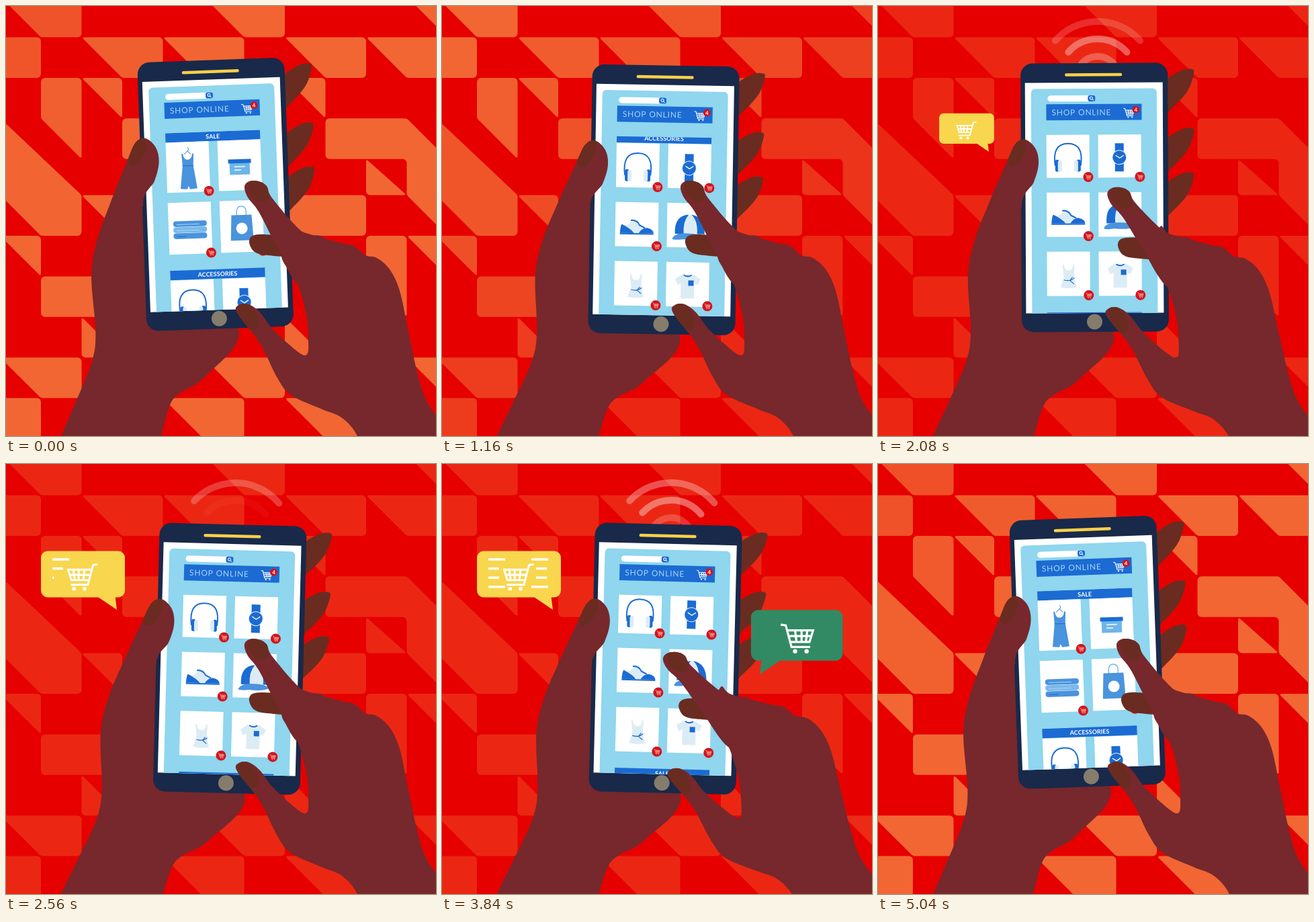
Write an HTML page with a canvas that moves like this. It is 640 px wide and 640 px high and loops after 5080 ms.

```html
<!DOCTYPE html>
<html lang="en">
<head>
<meta charset="utf-8">
<title>Shop online</title>
<style>
html, body { margin: 0; overflow: hidden; background: #e60000; }
canvas { display: block; }
</style>
</head>
<body>
<canvas id="stage" width="640" height="640"></canvas>
<script>
const g = document.getElementById('stage').getContext('2d');
const LOOP = 5080, STEP = 40, BEAT = 1680, LIST = 486;
const RED = '#e60000', NAVY = '#18294a', BLUE = '#1b6bd3', MID = '#4a93dd', SKY = '#8fd6ee',
  PALE = '#dcecf5', SKIN = '#76282c', DARK = '#6a2c20', BADGE = '#d3141c';

const clamp = v => Math.min(1, Math.max(0, v));
const ramp = (t, a, b) => clamp((t - a) / (b - a));
const swing = (t, a, b) => (1 - Math.cos(Math.PI * ramp(t, a, b))) / 2;
const easeOut = (t, a, b) => 1 - (1 - ramp(t, a, b)) ** 2;
const backOut = x => 1 + 2.7 * (x - 1) ** 3 + 1.7 * (x - 1) ** 2;

// ---------- drawing helpers ----------
function group(draw) { g.save(); draw(); g.restore(); }
function turn(deg, x, y) {
  g.translate(x, y);
  g.rotate(deg * Math.PI / 180);
  g.translate(-x, -y);
}
function rect(x, y, w, h, color, r = 0) {
  g.fillStyle = color;
  g.beginPath();
  g.roundRect(x, y, w, h, r);
  g.fill();
}
function oval(x, y, rx, ry, angle, color) {
  g.fillStyle = color;
  g.beginPath();
  g.ellipse(x, y, rx, ry, angle, 0, 7);
  g.fill();
}
const disc = (x, y, r, color) => oval(x, y, r, r, 0, color);
function fill(d, color) { g.fillStyle = color; g.fill(new Path2D(d)); }
function line(d, color, w) {
  g.strokeStyle = color;
  g.lineWidth = w;
  g.stroke(new Path2D(d));
}
function label(s, x, y, font, color, align = 'center', spacing = 0) {
  g.font = font + ' Lato, sans-serif';
  g.fillStyle = color;
  g.textAlign = align;
  g.letterSpacing = spacing + 'px';
  g.fillText(s, x, y);
}
// Closed Catmull-Rom outline through a few "x,y" points.
function outline(text) {
  const p = text.split(' ').map(s => s.split(',').map(Number)), path = new Path2D();
  const at = i => p[(i + p.length) % p.length];
  path.moveTo(...p[0]);
  p.forEach((a, i) => {
    const z = at(i - 1), b = at(i + 1), c = at(i + 2);
    path.bezierCurveTo(a[0] + (b[0] - z[0]) / 6, a[1] + (b[1] - z[1]) / 6,
      b[0] - (c[0] - a[0]) / 6, b[1] - (c[1] - a[1]) / 6, ...b);
  });
  return path;
}
function limb(path, nail) {
  g.fillStyle = SKIN;
  g.fill(path);
  group(() => {
    g.clip(path);
    oval(...nail, DARK);
  });
}
function cart(x, y, size, color, flip = 1) {
  group(() => {
    g.translate(x, y);
    g.scale(size * flip, size);
    line('M-23-18L-16-17L-8 13H18M-14-10H22L17 6H-10M-12-2H19M-3-10L-1 6M6-10V6M14-10L12 6', color, 3);
    disc(-3, 19, 3, color);
    disc(13, 19, 3, color);
  });
}

// ---------- background: shapes as corner steps on a square grid ----------
const KINDS = {
  s: '00 20 21 11', d: '00 10 12 01', t: '00 10 11', l: '00 11 01',
  x: '00 10 11 01', r: '00 20 21 01', b: '00 22 23 13 02', h: '00 20 31 33 22 21 01'
};
const PATTERN = [
  's....s....s', 'x.s.s..s.s', '.dt....t', 'b..x....h', '.........l', '..t....r',
  't........ds', '.r', '..l....l', 's....s....s', 'x...s..s'
];
const gridX = c => c * 60.5 - 8.5;
const gridY = r => r * 60.4 + (r < 4 ? 46.5 : 40);
const tiles = PATTERN.flatMap((cells, r) => [...cells].flatMap((kind, c) => {
  if (kind === '.') return [];
  const pts = KINDS[kind].split(' ').map(([x, y]) => [gridX(c + +x), gridY(r - 1 + +y)]);
  const far = clamp(1 - pts.reduce((s, [x, y]) => s + 0.45 * x + 0.55 * y, 0) / pts.length / 640);
  return [{ pts, far }];
}));
// Square corners are rounded, sharp ones hardly.
function tile(p) {
  const n = p.length, at = i => p[(i + n) % n];
  g.beginPath();
  g.moveTo((at(-1)[0] + p[0][0]) / 2, (at(-1)[1] + p[0][1]) / 2);
  p.forEach(([x, y], i) => {
    const [a, b] = at(i - 1), [u, v] = at(i + 1);
    g.arcTo(x, y, u, v, (a - x) * (u - x) + (b - y) * (v - y) > 500 ? 1.5 : 6);
  });
  g.fill();
}
function background(t) {
  rect(0, 0, 640, 640, RED);
  const late = t < 400 ? t + LOOP : t;
  for (const { pts, far } of tiles) {
    const out = 400 + far * 850, back = 3740 + far * 900;
    const glow = late < 3000 ? 1 - ramp(t, out, out + 550) : ramp(late, back, back + 700);
    g.fillStyle = `rgba(242,102,51,${0.38 + 0.62 * glow})`;
    tile(pts);
  }
}

// ---------- shop items, each around its own centre ----------
const items = {
  dress() {
    line('M-5-22L0-27L5-22M0-27Q4-30 0-32', MID, 1);
    fill('M-9-23H-7Q-6-14 0-14Q6-14 7-23H9L8-5L13 29L2 30L0 25L-2 30L-12 29L-8-5Z', MID);
    line('M-8-5H8', BLUE, 1);
  },
  parcel() {
    rect(-15, -7, 30, 18, '#6db5ea');
    rect(-17, -12, 34, 6, BLUE);
    line('M-8-1H8M-8 4H2', PALE, 2);
  },
  towels() {
    for (const y of [-14, -5, 4]) {
      rect(-25, y, 50, 8.5, y === -5 ? '#79b9ea' : MID, 4);
      line(`M-20 ${y + 5}H${y > 0 ? -6 : 14}`, y > 0 ? BLUE : '#a9d4f5', 1);
    }
  },
  bag() {
    line('M-7-19V-26Q-6-33 0-33Q6-33 7-26V-19', '#79b9ea', 1.5);
    fill('M-15-20H15L17 18H-17Z', MID);
    disc(0, 0, 8.5, '#fff');
  },
  phones() {
    line('M-19 12Q-24-21 0-21Q24-21 19 12', BLUE, 2);
    for (const s of [-1, 1]) {
      rect(s * 16 - 3, 3, 6, 18, BLUE, 3);
      rect(s * 12 - 3, 4, 6, 17, PALE, 3);
    }
  },
  watch() {
    rect(-7, -21, 13, 42, BLUE);
    disc(-0.5, 0, 11, PALE);
    disc(-0.5, 0, 10, BLUE);
    line('M-6-3L0 1L6-3', '#fff', 1.3);
  },
  shoe() {
    fill('M-25 10Q-24-3-22-3Q-12 2-6-11L2-9Q6 1 16 2Q25 4 25 10Z', PALE);
    fill('M-25 10Q-24-3-22-3Q-8 4-4 10ZM3 10Q8 2 15 2Q25 4 25 10Z', BLUE);
    line('M-9-9Q0-10 4-2L12 2M-25 11H25', BLUE, 2);
  },
  cap() {
    fill('M-20 10Q-22-19 2-19Q23-18 24 10Z', PALE);
    fill('M-20 10Q-22-17 0-19Q-9-8-7 10ZM13 10Q14-10 4-19Q24-16 24 10Z', BLUE);
    fill('M-24 17Q-20 8 0 9Q16 9 23 15Q14 20-8 18Q-24 20-24 17Z', MID);
  },
  top() {
    fill('M-9-17L-7-17Q-6-8 0-8Q6-8 7-17L9-17L8 2L12 17Q0 20-12 17L-7 2Z', PALE);
    line('M-7 6Q2 9 9 3M2 7L8 12M2 7L6 2', BLUE, 1.2);
  },
  shirt() {
    fill('M-8-18Q0-13 8-18L19-11L15-2L10-5V18H-10V-5L-15-2L-19-11Z', PALE);
    line('M-6-17Q0-13 6-17', BLUE, 2);
    rect(1, -9, 8, 8, BLUE);
  }
};
function shelf(y, h, ...names) {
  names.forEach((name, i) => {
    const x = 252 + 77 * i;
    rect(x, y, 64, h, '#fff');
    group(() => {
      g.translate(x + 32, y + h / 2 + 3);
      items[name]();
    });
    disc(x + 62, y + h - 1, 7.5, BADGE);
    cart(x + 62, y + h - 1, 0.2, '#f6c3b8');
  });
}
function heading(text, y) {
  rect(252, y - 7, 141, 14, BLUE);
  label(text, 322.5, y + 3.3, 'bold 9px', '#fff');
}
function catalogue() {
  heading('SALE', 198.5);
  shelf(205.5, 75, 'dress', 'parcel');
  shelf(295.5, 77, 'towels', 'bag');
  heading('ACCESSORIES', 403.5);
  shelf(411, 66, 'phones', 'watch');
  shelf(499, 66, 'shoe', 'cap');
  shelf(587, 66, 'top', 'shirt');
}

// ---------- phone and left hand ----------
function scroll(t) {
  return 221.5 * easeOut(t, 460, 1370) + 2.5 * ramp(t, 2080, 3080) + 262 * easeOut(t, 3830, 5020);
}
function phone(t) {
  rect(214, 85, 219, 400, NAVY, 18);
  rect(280, 100, 85, 4.5, '#f8d04a', 2);
  rect(220.5, 114, 205, 343, '#fff');
  rect(229.5, 123, 187, 334, SKY, [6, 6, 0, 0]);
  disc(322.5, 470, 11.5, '#857c6c');

  rect(254, 133, 71, 9, '#fff', 4.5);
  rect(314, 133, 11, 9, BLUE, 3);
  line('M320.5 138.5L322.5 140.5M321 137A2 2 0 1 1 317 137A2 2 0 1 1 321 137', '#fff', 1);
  rect(252, 146, 142, 24, BLUE);
  label('SHOP ONLINE', 260, 162.5, '12px', '#a9d4f5', 'left', 0.8);
  cart(375, 159, 0.36, '#fff');
  disc(385.5, 154.5, 5.5, BADGE);
  label('4', 385.5, 157.5, 'bold 8px', '#fff');

  group(() => {
    g.beginPath();
    g.rect(229, 191.5, 188, 265.5);
    g.clip();
    g.translate(0, -scroll(t));
    catalogue();
    g.translate(0, LIST);
    catalogue();
  });
}
function wifi(p) {
  g.lineCap = 'round';
  for (let i = 0; i < 3; i++) {
    const a = 0.55 * clamp((p - 100 - 100 * i) / 250) * clamp((700 + 220 * i - p) / 500);
    g.strokeStyle = `rgba(248,205,200,${a})`;
    g.lineWidth = 10;
    g.beginPath();
    g.arc(327, 107, 32 + 26 * i, -2.42, -0.72);
    g.stroke();
  }
  g.lineCap = 'butt';
}
const backFinger = outline('425,20 449,0 467,-3 470,4 461,29 440,53 425,62');
const holder = outline('82,640 105,590 131,530 138,485 134,400 145,345 166,292 192,232 205,205 220,199 ' +
  '235,213 239,235 232,262 214,300 240,400 350,485 300,555 260,580 245,598 232,640 215,690 62,690');
const thumbNail = [207, 218, 11, 23, 0.45];
function leftHand(t, p) {
  const lift = swing(p, 300, 500) - swing(p, 1000, 1640);
  turn(-1.55 + 3.08 * lift, 143, 656);
  wifi(p);
  for (const y of [97, 185, 251]) group(() => {
    g.translate(0, y);
    g.fillStyle = DARK;
    g.fill(backFinger);
  });
  limb(holder, thumbNail);
  group(() => {
    turn(-0.5 + 0.45 * lift, 323, 470);
    phone(t);
  });
  group(() => {
    g.beginPath();
    g.rect(0, 0, 260, 300);
    g.clip();
    limb(holder, thumbNail);
  });
}

// ---------- right hand ----------
const palm = outline('425,325 441,336 500,353 518,357 535,371 552,375 571,392 586,424 599,485 612,545 626,588 ' +
  '660,640 670,690 540,690 523,640 500,613 470,600 424,579 403,552 378,502 344,457 347,445 361,444 ' +
  '378,456 400,484 444,520 450,494 446,455 432,408 410,372');
const index = outline('355,269 362,261 376,261 388,268 397,287 441,336 475,347 480,400 436,415 400,352 376,306 360,285');
const middle = outline('362,352 367,342 385,340 408,345 425,371 390,371 370,366');
function rightHand(p) {
  const press = swing(p, 300, 500) - swing(p, 540, 900);
  turn(-2 * press, 640, 640);
  g.fillStyle = DARK;
  g.fill(middle);
  limb(palm, [360, 461, 12, 24, -0.5]);
  turn(-6.6 * press, 450, 400);
  limb(index, [376, 275, 13, 19, -0.6]);
}

// ---------- speech bubbles, drawn from the tip of the tail ----------
function bubble(t, x, y, color, from, to, side, order) {
  const age = t - from;
  const size = backOut(ramp(age, 0, 500)) * (1 - ramp(t, to, to + 160));
  if (age <= 0 || size <= 0) return;
  group(() => {
    g.translate(x, y);
    g.scale(size * side, size);
    rect(-113, -87.5, 125, 69, color, 10);
    fill('M-28-19L0 0L-3-24Z', color);
    cart(-51, -50, 0.98, '#fff', -1);
    [...order].forEach((k, i) => {
      const n = k % 4, outer = n % 3 === 0;
      const w = (outer ? 25 : 16) * ramp(age, 290 + i * 130, 420 + i * 130);
      const start = k < 4 ? -96 : outer ? -32 : -25;
      if (w) line(`M${start} ${-75 + n * 13.6}h${w}`, '#fff', 3.5);
    });
  });
}

function frame() {
  const t = Math.floor(performance.now() % LOOP / STEP) * STEP, p = t % BEAT;
  background(t);
  group(() => leftHand(t, p));
  bubble(t, 165, 217, '#f8d64e', 1990, 4200, 1, '01234567');
  bubble(t, 473, 313, '#328a64', 3580, 4800, -1, '40123567');
  group(() => rightHand(p));
  requestAnimationFrame(frame);
}
frame();
</script>
</body>
</html>
```
